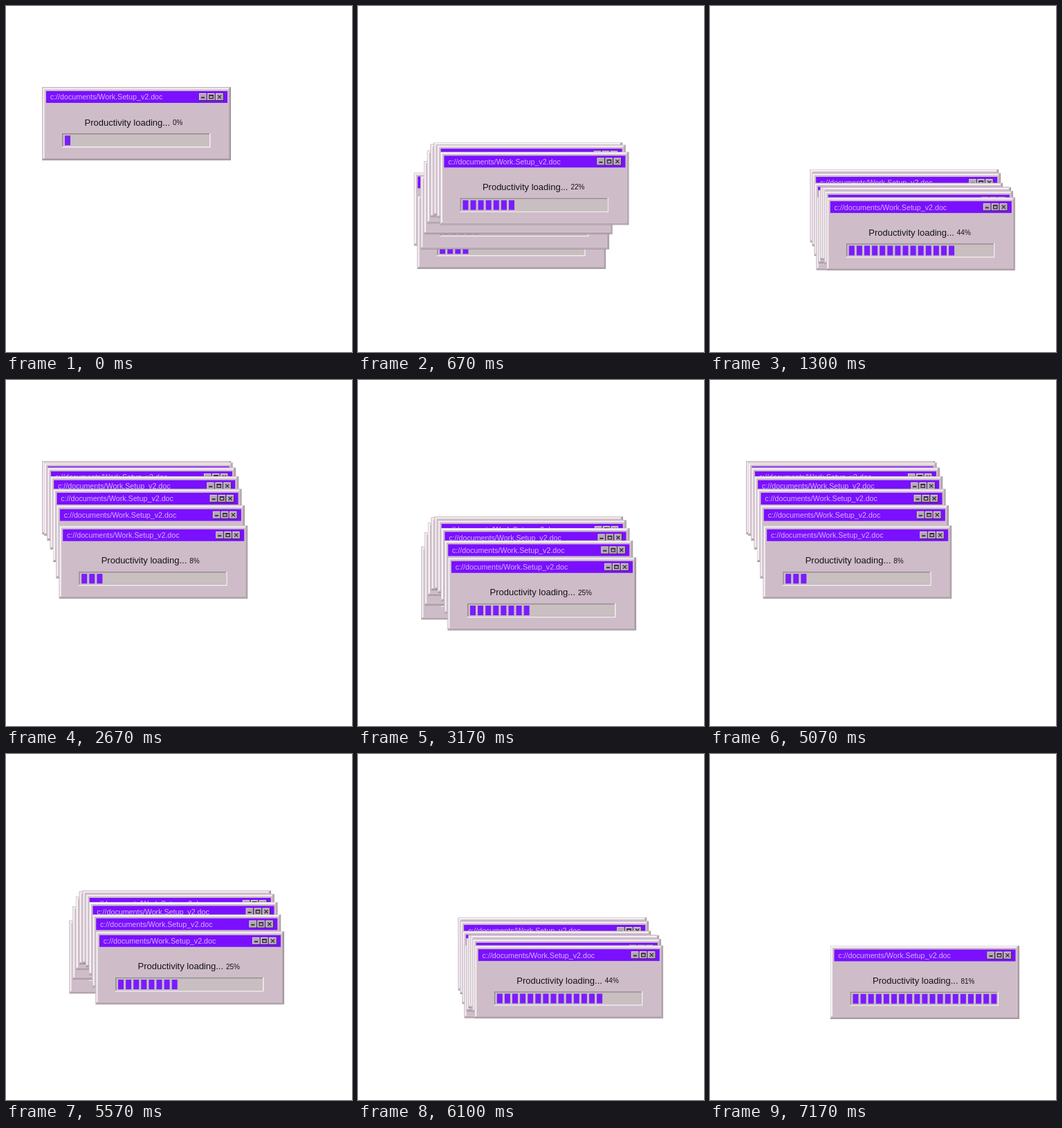
An HTML page with a canvas for the animation above (7210 ms loop, 500 px wide and 500 px high).

```html
<!DOCTYPE html>
<html lang="en">
<head>
<meta charset="utf-8">
<title>Productivity loading</title>
<style>
html, body { margin: 0; width: 100%; height: 100%; overflow: hidden; background: #fff; }
canvas { display: block; }
</style>
</head>
<body>
<canvas id="stage" width="500" height="500"></canvas>
<script>
const ctx = document.getElementById('stage').getContext('2d');
const LOOP = 7210, CYCLE = 2400, FRAME = 1000 / 30;
const ECHOES = 8, LAG = 45;
const FALL_START = 5, FALL_TIME = 343, FLOOR = 159.5;
const FONT = '"Liberation Sans", Arial, sans-serif';
// Bounces after the first landing: [duration, height]
const BOUNCES = [[450, 80], [274, 41], [225, 16], [120, 4], [80, 1]];
// Sideways path: [time, distance]
const PATH = [[15, 0], [270, 24.5], [800, 80.5], [940, 92.2], [1300, 115.8], [1670, 121.5]];

function rect(x, y, w, h, color) {
  ctx.fillStyle = color;
  ctx.fillRect(x, y, w, h);
}

// Filled box with a lit top-left and a shaded bottom-right edge
function bevel(x, y, w, h, face, light, dark, edge) {
  rect(x, y, w, h, dark);
  rect(x, y, w - edge, h - edge, light);
  rect(x + edge, y + edge, w - 2 * edge, h - 2 * edge, face);
}

function label(text, x, y, size, color) {
  ctx.font = size + 'px ' + FONT;
  ctx.fillStyle = color;
  ctx.fillText(text, x, y);
}

function drift(t) {
  if (t <= PATH[0][0]) return 0;
  for (let i = 1; i < PATH.length; i++) {
    const [t0, x0] = PATH[i - 1], [t1, x1] = PATH[i];
    if (t < t1) return x0 + (x1 - x0) * (t - t0) / (t1 - t0);
  }
  return PATH[PATH.length - 1][1];
}

// Free fall followed by shrinking bounces
function drop(t) {
  let s = Math.max(0, t - FALL_START);
  if (s < FALL_TIME) return FLOOR * (s / FALL_TIME) ** 2;
  s -= FALL_TIME;
  for (const [time, height] of BOUNCES) {
    if (s < time) return FLOOR - height * (1 - (2 * s / time - 1) ** 2);
    s -= time;
  }
  return FLOOR;
}

function drawButtons() {
  const ink = '#30263a';
  for (let i = 0; i < 3; i++)
    bevel(226.5 + 12 * i, 8.5, 11.5, 11, '#b3a6b1', '#ded3dc', '#3b2b4b', 1);
  rect(229.5, 14, 5, 1.8, ink);
  rect(241, 11, 6, 1.6, ink);
  ctx.strokeStyle = ink;
  ctx.lineWidth = 1.2;
  ctx.strokeRect(241.3, 11.5, 5.4, 4.6);
  ctx.beginPath();
  ctx.moveTo(253.5, 11.3);
  ctx.lineTo(258.5, 16.3);
  ctx.moveTo(258.5, 11.3);
  ctx.lineTo(253.5, 16.3);
  ctx.stroke();
}

function drawWindow(t) {
  ctx.save();
  ctx.translate(52.5 + drift(t), 117.5 + drop(t));

  bevel(0, 0, 272.5, 105.5, '#cdbcc7', '#e2d9de', '#988a93', 1);
  bevel(1, 1, 270.5, 103.5, '#cebdc8', '#f8f3f6', '#b5a5af', 2);

  rect(5.5, 5.5, 262, 17, '#7a10ff');
  label('c://documents/Work.Setup_v2.doc', 11.3, 17.9, 10.7, '#d5b3ff');
  drawButtons();

  label('Productivity loading...', 61, 55, 13, '#17111a');
  const percent = Math.floor(Math.max(0, t - 30) * 0.0348);
  label(percent + '%', 188.5, 54.5, 10, '#17111a');

  bevel(28.5, 66.5, 214.5, 20.5, '#c9bfc0', '#958a90', '#f6eff3', 1.5);
  const blocks = Math.min(19, 1 + Math.floor(t / 98));
  for (let i = 0; i < blocks; i++)
    rect(32.5 + 11.1 * i, 69.8, 8, 14, '#7a1cff');

  ctx.restore();
}

function render(now) {
  const time = Math.min(now % LOOP, 3 * CYCLE - 1);
  const phase = Math.floor((time % CYCLE) / FRAME + 0.01) * FRAME;
  const t = phase < 99 ? 0 : phase;
  rect(0, 0, 500, 500, '#fff');
  for (let i = ECHOES; i >= 0; i--) drawWindow(Math.max(0, t - i * LAG));
}

const start = performance.now();
function tick() {
  render(performance.now() - start);
  requestAnimationFrame(tick);
}
tick();
</script>
</body>
</html>
```
